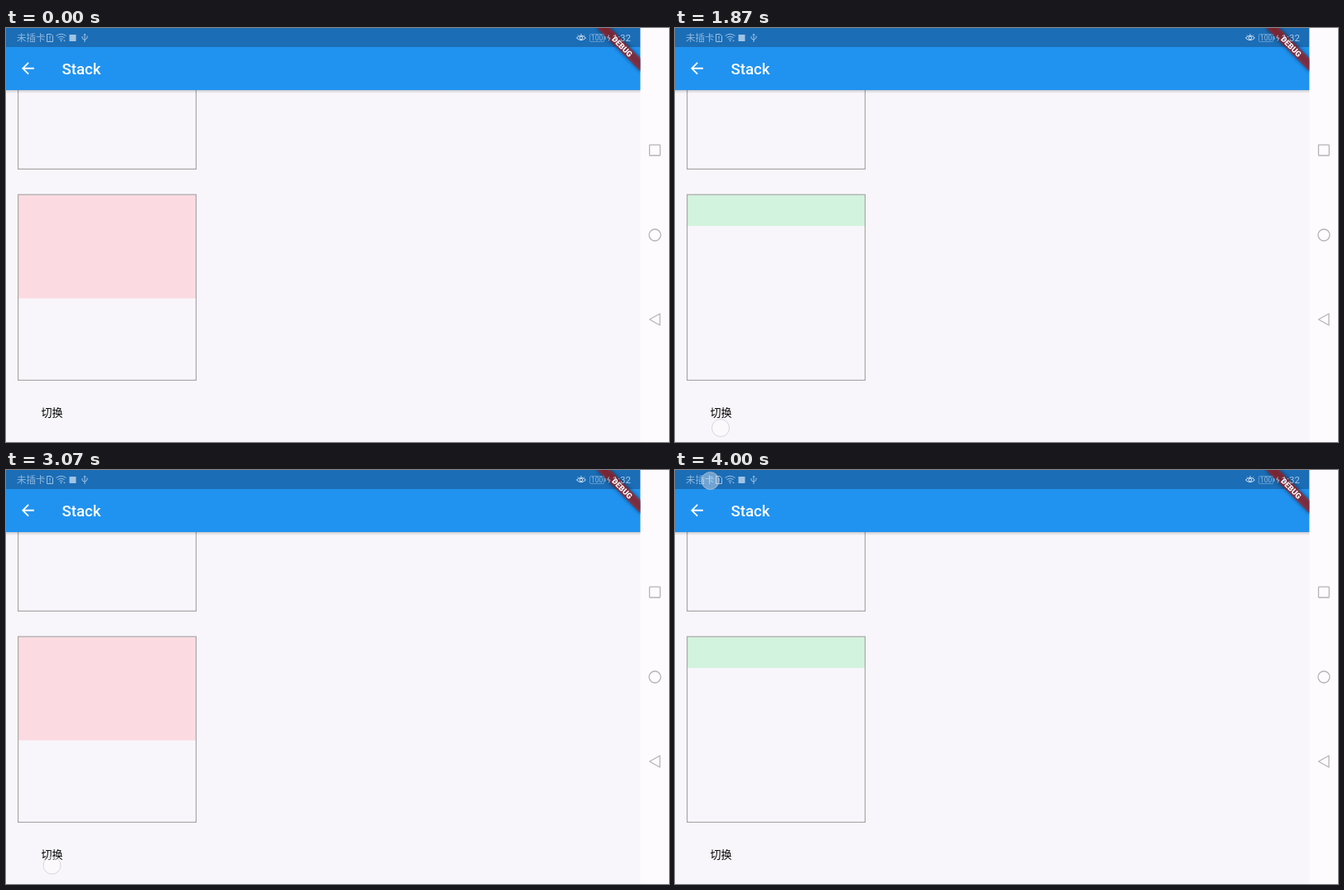
These frames come from a looping animation (800x500 px, 4.07 s). An HTML page:

```html
<!DOCTYPE html>
<html lang="zh-CN">
<head>
<meta charset="utf-8">
<title>Stack</title>
<style>
  html, body { margin: 0; width: 100%; height: 100%; overflow: hidden; background: #f8f6fa; }
  svg { display: block; width: 800px; height: 500px; }
  text { font-family: Roboto, "Noto Sans CJK SC", "Noto Sans CJK", sans-serif; }
  .frame { fill: none; stroke: #aaa8ac; stroke-width: 1.2; }
  .nav { fill: none; stroke: #b6b4b9; stroke-width: 1.3; }
  .icon { fill: none; stroke: #9fc4e4; stroke-width: 1; }
  .status { fill: #8fb8dd; font-size: 11.5px; }
  .bright { stroke: #cfe1f1; }
</style>
</head>
<body>
<svg viewBox="0 0 800 500">
  <defs>
    <linearGradient id="shade" x2="0" y2="1">
      <stop stop-color="#000" stop-opacity=".17"/>
      <stop offset="1" stop-color="#000" stop-opacity="0"/>
    </linearGradient>
    <filter id="blur" x="-20%" y="-80%" width="140%" height="260%"><feGaussianBlur stdDeviation="2.5"/></filter>
    <clipPath id="button"><rect x="14.5" y="446.5" width="82" height="33.5" rx="2"/></clipPath>
    <clipPath id="screen"><rect width="765.4" height="500"/></clipPath>
  </defs>

  <rect width="800" height="500" fill="#f8f6fa"/>
  <path class="frame" d="M14.6 70V170.4H229.4V70"/>
  <rect id="panel" x="15" y="201" width="214"/>
  <rect class="frame" x="14.6" y="201.2" width="214.8" height="224.2"/>
  <g clip-path="url(#button)"><circle id="ripple" fill="#dfdde2"/></g>
  <text x="42.5" y="469" font-size="13">切换</text>

  <rect x="765.4" width="34.6" height="500" fill="#fdfbfe"/>
  <g class="nav">
    <rect x="776.5" y="141.2" width="12.8" height="12.8" rx=".5"/>
    <circle cx="783" cy="250" r="7"/>
    <path d="M776.5 352L789 345V359z" stroke-linejoin="round"/>
  </g>

  <g clip-path="url(#screen)">
    <rect y="75" width="766" height="4" fill="url(#shade)"/>
    <rect y="23" width="766" height="52" fill="#2093f0"/>
    <rect width="766" height="23" fill="#1b6db6"/>
    <g transform="translate(766 0) rotate(45)">
      <rect x="-37.3" y="26.1" width="74.6" height="11.2" opacity=".5" filter="url(#blur)"/>
      <rect x="-37.3" y="26.1" width="74.6" height="11.2" fill="#b71c1c" opacity=".63"/>
      <text y="35.1" text-anchor="middle" font-size="9.5" font-weight="900" fill="#fff">DEBUG</text>
    </g>
  </g>

  <path transform="translate(15.3 37.6) scale(.93)" fill="#fff"
    d="M20 11H7.8l5.6-5.6L12 4l-8 8 8 8 1.4-1.4L7.8 13H20z"/>
  <text x="67.5" y="56" font-size="18.6" font-weight="500" fill="#fff">Stack</text>

  <text class="status" x="13" y="16">未插卡</text>
  <g class="icon">
    <path d="M50 7.5H54L56.5 9.5V16.5H49.5V7.5zM53 9.5V13M53 14V15.2"/>
    <path d="M60.5 9.5Q66.5 5 72.5 9.5M62.5 11.5Q66.5 8.5 70.5 11.5M64.5 13.5Q66.5 12 68.5 13.5"/>
    <circle cx="66.5" cy="15.3" r=".6"/>
    <circle cx="70.5" cy="15.3" r=".5"/>
    <rect x="77" y="8.5" width="7" height="7" fill="#9fc4e4"/>
    <path d="M95 7V17M92 10V12.5L95 14.5L98 12V9.5M94 8.5L95 7L96 8.5"/>
    <path class="bright" d="M688.5 12Q694 6.5 699.5 12Q694 17.5 688.5 12M690 8.5L691 9.5M694 7V8.5M698 8.5L697 9.5"/>
    <circle class="bright" cx="694" cy="12" r="1.8"/>
    <rect x="704.5" y="7.5" width="17" height="9" rx="1" opacity=".5"/>
    <path d="M723 10V14M727.5 8.5L726 12H729L727 15.5"/>
  </g>
  <text class="status" x="706" y="15.3" style="font-size:8.5px">100</text>
  <text class="status" x="754" y="16" text-anchor="end" style="fill:#a9c8e4">1:32</text>

  <circle id="touch" r="10.5" fill="#fff" fill-opacity=".38" stroke="#c9c7cf" stroke-opacity=".7"/>
</svg>
<script>
const LOOP = 4070, STEP = 200 / 3;
const PINK = { fill: '#fbdbe1', height: 125.5 };
const GREEN = { fill: '#d2f3dd', height: 38 };

// Ripple start and position of each press
const taps = [
  { at: 1137, x: 46, y: 482 },
  { at: 1930, x: 55, y: 483 },
  { at: 2350, x: 46, y: 475 },
  { at: 3070, x: 55.5, y: 477.5 }
];
const switches = [[0, PINK], [1200, GREEN], [1930, PINK], [3070, GREEN]];
const statusTouch = { from: 3866, x: 42.5, y: 13 };

const $ = id => document.getElementById(id);
const panel = $('panel'), ripple = $('ripple'), touch = $('touch');
const set = (el, attrs) => {
  for (const [name, value] of Object.entries(attrs)) el.setAttribute(name, value);
};
const clamp = v => Math.max(0, Math.min(1, v));

function draw(t) {
  set(panel, switches.findLast(([at]) => t >= at)[1]);

  const tap = taps.find(({ at }) => t >= at - 72 && t < at + 320);
  if (tap) {
    const { x, y } = tap, age = t - tap.at;
    set(ripple, {
      cx: x, cy: y, r: Math.max(0, 7 + age * 0.4),
      opacity: age < 0 ? 0 : clamp(1 - (age - 110) / 170)
    });
    set(touch, { cx: x, cy: y, opacity: clamp(1 - (age - 30) / 190) });
  } else {
    set(ripple, { opacity: 0 });
    set(touch, { cx: statusTouch.x, cy: statusTouch.y, opacity: t >= statusTouch.from ? 1 : 0 });
  }
}

const start = performance.now();
function tick() {
  const t = Math.max(0, performance.now() - start) % LOOP;
  // Steps begin on times rounded to 10 ms, hence the half-unit margin
  draw(Math.floor((t + 5) / STEP) * STEP);
  requestAnimationFrame(tick);
}
tick();
</script>
</body>
</html>
```
